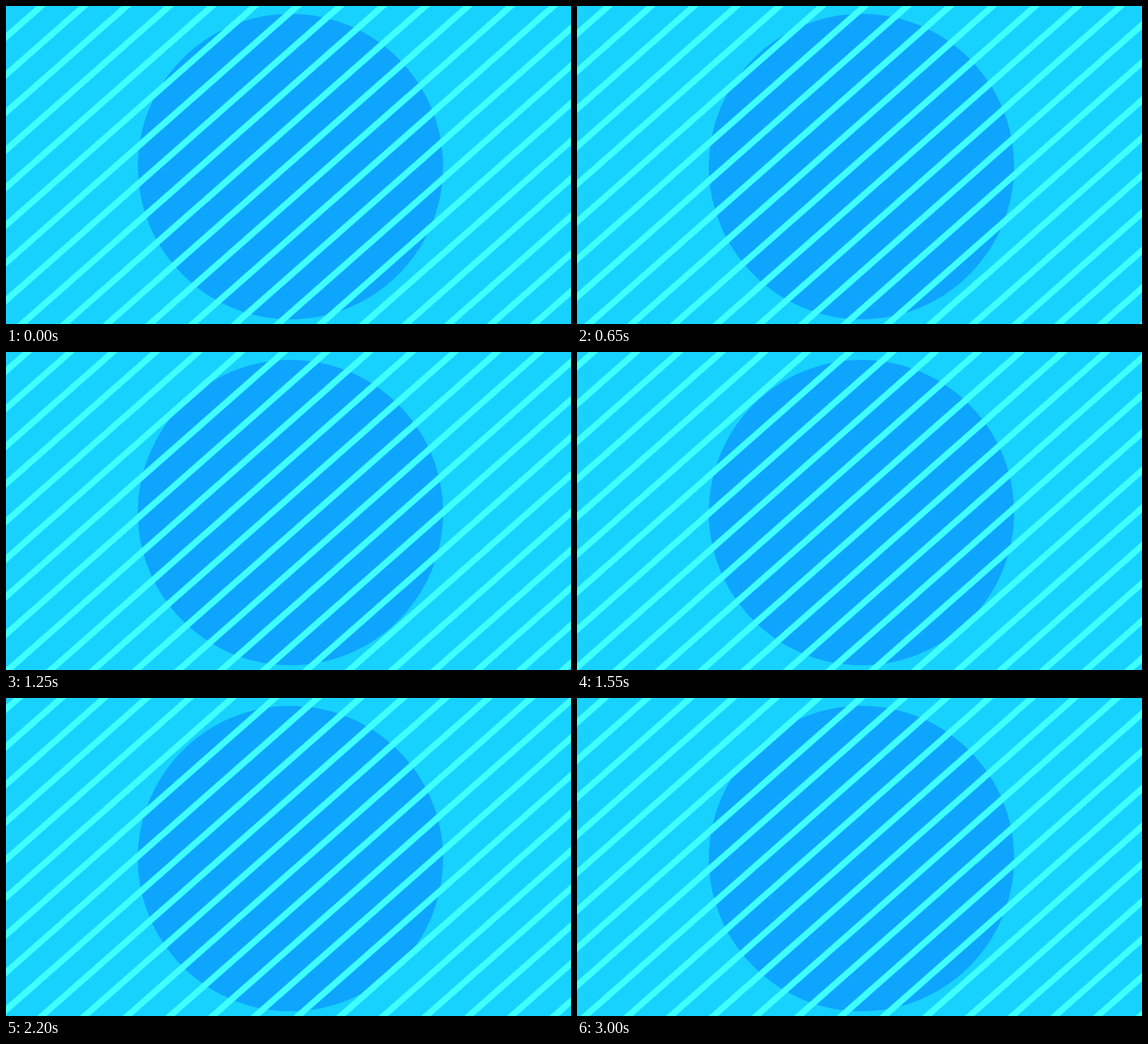
An HTML page that plays this animation: 720 by 405 pixels, repeating every 3050 ms.

```html
<!DOCTYPE html>
<html lang="en">
<head>
<meta charset="utf-8">
<title>Drifting stripes</title>
<style>
  html, body { margin: 0; width: 100%; height: 100%; overflow: hidden; background: #17d2ff; }
  svg { display: block; width: 100%; height: 100%; }
</style>
</head>
<body>
<svg viewBox="0 0 720 405">
  <rect width="720" height="405" fill="#17d2ff"/>
  <circle cx="362.5" cy="204.5" r="194.5" fill="#0ea5ff"/>
  <path id="stripes" fill="none" stroke="#40ffff" stroke-width="8"/>
</svg>
<script>
  const LOOP = 3050, STEP = 50;
  const GAP = 54.4;      // horizontal distance between stripes
  const LEAN = 460 / 405; // horizontal run per pixel of height
  const SPEED = 0.16;    // px per ms
  const START = 45;      // where a stripe meets the top edge at time 0
  const stripes = document.getElementById('stripes');

  let d = '';
  for (let x = -GAP; x < 720 + 460 + GAP; x += GAP) {
    d += `M${x + 20 * LEAN} -20L${x - 425 * LEAN} 425`;
  }
  stripes.setAttribute('d', d);

  function draw(ms) {
    const time = Math.floor((ms % LOOP) / STEP) * STEP;
    const shift = (START + SPEED * time) % GAP;
    stripes.setAttribute('transform', `translate(${shift.toFixed(2)} 0)`);
  }

  const begin = performance.now();
  function tick() {
    draw(performance.now() - begin);
    requestAnimationFrame(tick);
  }
  draw(0);
  requestAnimationFrame(tick);
</script>
</body>
</html>
```
